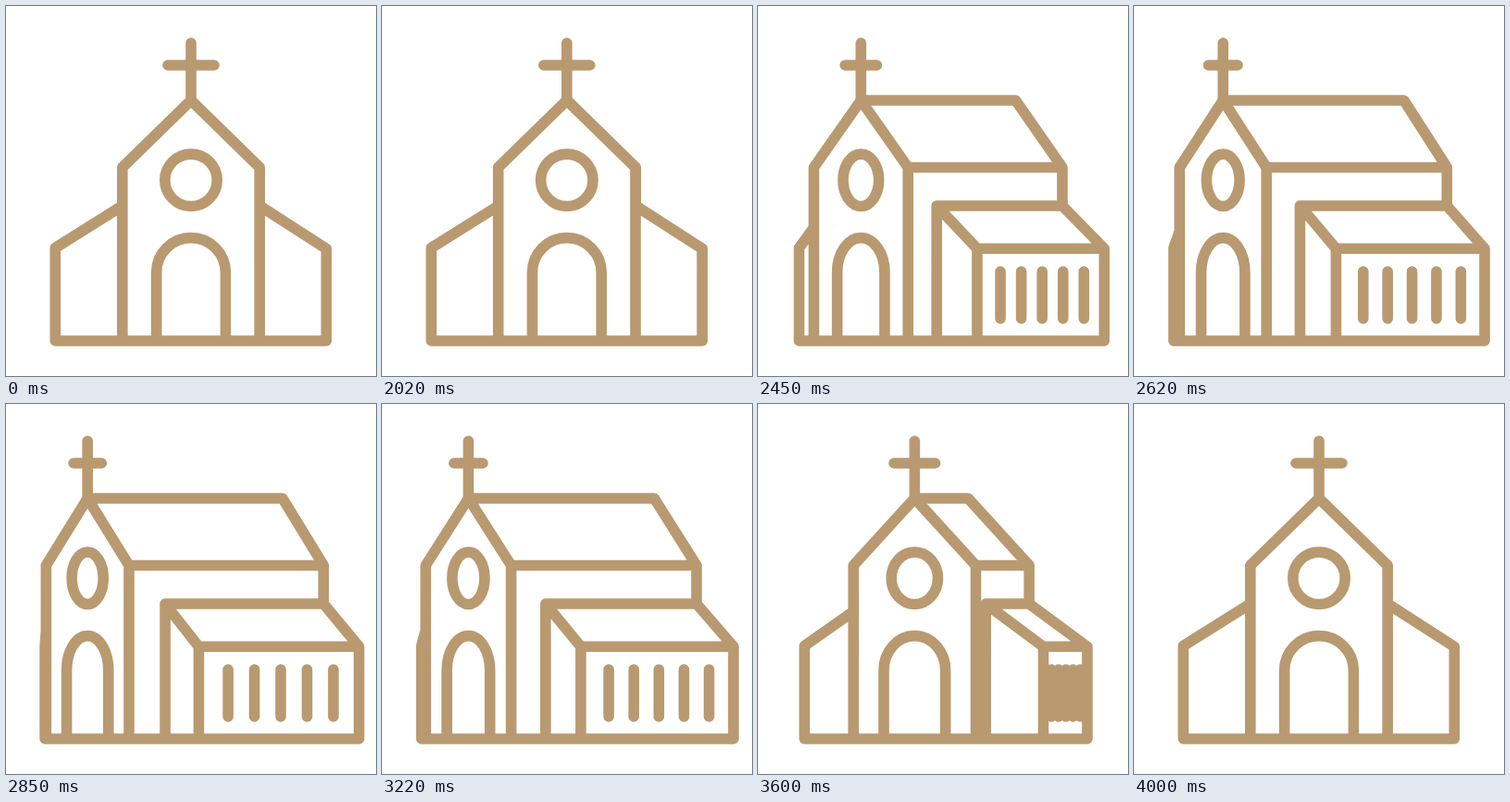
Write an HTML page that moves like this. It is 400 px wide and 400 px high and loops after 4.02 s.

```html
<!DOCTYPE html>
<html>
<head>
<meta charset="utf-8">
<style>
html, body { margin: 0; height: 100%; overflow: hidden; background: #fff; }
svg { display: block; width: 100vw; height: 100vh; }
path { fill: none; stroke: #b99970; stroke-width: 11.6; stroke-linecap: round; stroke-linejoin: round; }
</style>
</head>
<body>
<svg viewBox="0 0 400 400"><path id="church"/></svg>
<script>
const LOOP = 4020, TURN = 2000, BACK = 3000, END = 4000;
const church = document.getElementById('church');

// Cubic Bezier easing with control points (x1, 0) and (x2, 1)
function ease(x, x1, x2) {
  let lo = 0, hi = 1, t;
  for (let i = 0; i < 24; i++) {
    t = (lo + hi) / 2;
    const bx = 3 * x1 * t * (1 - t) ** 2 + 3 * x2 * t * t * (1 - t) + t ** 3;
    if (bx < x) lo = t; else hi = t;
  }
  return t * t * (3 - 2 * t);
}

// 0 = front view, 1 = turned view
function turnAt(ms) {
  if (ms <= TURN || ms >= END) return 0;
  if (ms < BACK) return ease((ms - TURN) / (BACK - TURN), 0.333, 0.1);
  return 1 - ease((ms - BACK) / (END - BACK), 0.62, 0.39);
}

const line = (...pts) => 'M' + pts.map(p => p.join(' ')).join('L');

function outline(p) {
  const mix = (a, b) => a + (b - a) * p;
  const s = mix(1, 0.6);
  const mid = mix(200, 87), left = mid - 74.2 * s, right = mid + 74.2 * s;
  const backTop = mix(200, 300), back = mix(274.2, 344);
  const wingL = mix(53.3, 42), wingIn = mix(274.2, 171);
  const wingOut = mix(346.3, 207), wingBack = mix(346.3, 382);
  const ring = 28.2 * s, door = 37.4 * s;
  const base = 362, eave = 174.5, wingTop = 216, wingEave = 262.3;

  const parts = [
    // cross
    line([mid, 40], [mid, 102]),
    line([mid - 25 * s, 64], [mid + 25 * s, 64]),
    // front, roof and long wall
    line([left, base], [left, eave], [mid, 102], [right, eave], [right, base]),
    line([mid, 102], [backTop, 102], [back, eave], [right, eave]),
    line([back, eave], [back, wingTop]),
    // side wings
    line([left, mix(216, 246)], [wingL, 261.5], [wingL, base], [wingBack, base],
      [wingBack, wingEave], [back, wingTop], [wingIn, wingTop], [wingIn, base]),
    line([wingIn, wingTop], [wingOut, wingEave], [wingOut, base]),
    line([wingOut, wingEave], [wingBack, wingEave]),
    // round window and door
    `M${mid - ring} 188.3a${ring} 28.2 0 1 1 ${2 * ring} 0a${ring} 28.2 0 1 1 ${-2 * ring} 0Z`,
    `M${mid - door} ${base}V288a${door} 37.4 0 0 1 ${2 * door} 0V${base}`
  ];
  for (let i = 0; i < 5; i++) {
    const x = mix(346.3, 239 + 28.75 * i);
    parts.push(line([x, 287], [x, 338]));
  }
  return parts.join('');
}

const start = performance.now();
function frame() {
  church.setAttribute('d', outline(turnAt((performance.now() - start) % LOOP)));
  requestAnimationFrame(frame);
}
frame();
</script>
</body>
</html>
```
